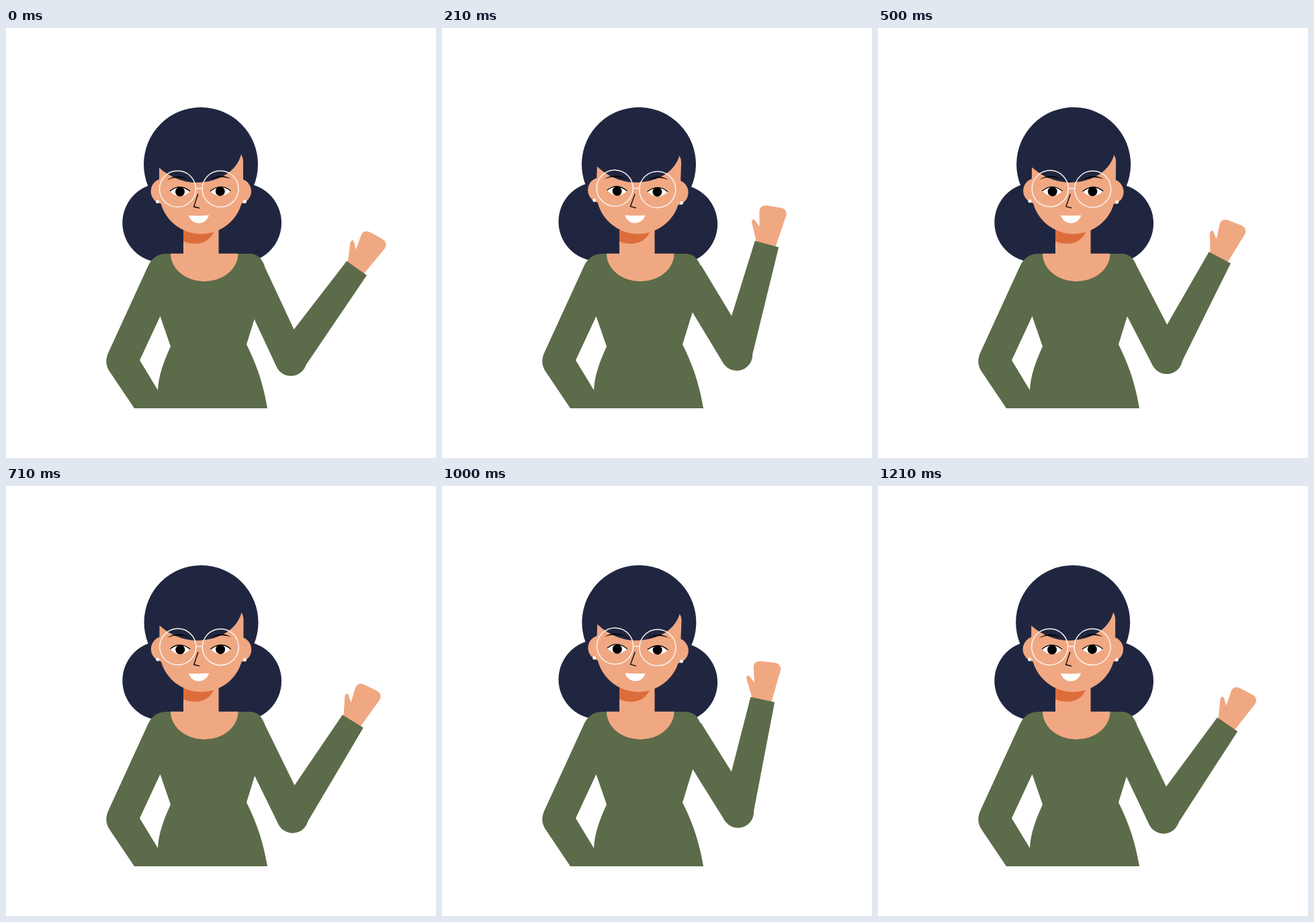
Recreate the animation shown at these times as an HTML page. Size 640 by 640 pixels, loop 1280 ms.

```html
<!DOCTYPE html>
<html lang="en">
<head>
<meta charset="utf-8">
<title>Waving woman</title>
<style>
  html, body { margin: 0; width: 100%; height: 100%; overflow: hidden; background: #fff; }
  svg { display: block; width: 100%; height: 100%; }
  .hair { fill: #212640; }
  .skin { fill: #f0a882; }
  .top { fill: #5c6b49; }
  .white { fill: #fff; }
  .line { fill: none; stroke: #000; stroke-width: 1.3; }
  .glass { fill: none; stroke: #fbf3ee; stroke-width: 1.5; }
</style>
</head>
<body>
<svg viewBox="0 0 640 640">
  <g class="head hair">
    <circle cx="232.3" cy="290" r="59"/>
    <circle cx="351" cy="290" r="59"/>
    <circle cx="290" cy="203" r="85"/>
  </g>

  <path class="skin" d="M264 280H316.500V340H264Z"/>
  <path fill="#dc6d3a" d="M264 290V317.500Q272 321 281 321C295 321 305 314 309.500 303V290Z"/>

  <path class="top" fill-rule="evenodd" d="M237 336H362C374 336 380 342 385 354V385L370 432L358 471C371 497 382 525 389 566H191L154 511Q146 499 151.500 485L212 353Q220 337 237 336Z
    M229.500 429L199 494.500L226 539C227 518 234 498 245 474Z"/>
  <path class="skin" d="M245 335.700H345.500A50.250 41.500 0 0 1 245 335.700Z"/>

  <g class="head">
    <circle class="skin" cx="234.500" cy="243" r="19"/>
    <circle class="skin" cx="346" cy="243" r="19"/>
    <path class="skin" d="M228 208C245 223 265 230 283 230C310 230 342 218 350 188Q353 193 353 198V244A62.500 62.500 0 0 1 228 244Z"/>
    <circle class="white" cx="225.500" cy="258.500" r="2.500"/>
    <circle class="white" cx="355.300" cy="258.500" r="2.500"/>

    <path d="M239 226.500Q256 215.500 272 225.500Q256 219 239 226.500Z"/>
    <path d="M304 225.500Q320 215.500 335 224.500Q320 219 304 225.500Z"/>

    <path class="white" d="M244 243Q258 230.500 274 243Q259 258 244 243Z"/>
    <path class="white" d="M304 243Q320 230 334.500 242.500Q319 257 304 243Z"/>
    <path class="line" stroke-width="1" d="M244 243Q258 230.500 274 243M304 243Q320 230 334.500 242.500"/>
    <circle cx="259" cy="243.800" r="7"/>
    <circle cx="318.800" cy="243" r="7"/>

    <path class="line" d="M285.800 247L279.500 266L288 268"/>
    <path class="white" d="M272 279Q287 280 302 278.500C300 286 294 290.500 287 290.500C280 290.500 274 286 272 279Z"/>

    <circle class="glass" cx="255.500" cy="239.500" r="27"/>
    <circle class="glass" cx="319" cy="239.500" r="27"/>
    <path class="glass" d="M282.500 238.700H292"/>
  </g>

  <!-- arm pieces hang from the shoulder and the elbow -->
  <g id="upper" class="top">
    <rect x="-23.500" y="14" width="47" height="142"/>
    <circle cy="156" r="23.500"/>
  </g>
  <g id="fore">
    <path class="skin" d="M-14.500 -165L-30.200 -194Q-31 -199 -27.800 -198.700Q-25.500 -198 -24 -196L-17.300 -190.500L-23 -211Q-26 -221.500 -15 -223.500L6 -225.800Q15.500 -226.500 16.800 -217L13.400 -165Z"/>
    <path class="top" d="M22.500 -4L18.300 -168.400H-18.300L-24.400 0Z"/>
  </g>
</svg>
<script>
  const LOOP = 1280, FPS = 14, FRAMES = 18, WAVE = 9;
  const SHOULDER = { x: 358, y: 353 }, ARM = 156;
  const heads = document.querySelectorAll('.head');
  const upper = document.getElementById('upper');
  const fore = document.getElementById('fore');

  const starts = Array.from({ length: FRAMES }, (_, i) => Math.round(i * 100 / FPS) * 10);

  // Blend of two smooth steps
  function ease(x) {
    const soft = x * x * (3 - 2 * x);
    const firm = x * x * x * (10 + x * (6 * x - 15));
    return 0.35 * soft + 0.65 * firm;
  }

  function swing(step) {
    const u = (step % WAVE + 0.22) / WAVE;
    return 1.06 * ease(u < 0.5 ? 2 * u : 2 - 2 * u);
  }

  function pose(k) {
    const a = 25 + 6.9 * k, rad = a * Math.PI / 180;
    const ex = SHOULDER.x + ARM * Math.sin(rad);
    const ey = SHOULDER.y + ARM * Math.cos(rad);
    for (const h of heads) h.setAttribute('transform', `rotate(${2.1 * k} 291 293)`);
    upper.setAttribute('transform', `translate(${SHOULDER.x} ${SHOULDER.y}) rotate(${-a})`);
    fore.setAttribute('transform',
      `translate(${ex} ${ey}) rotate(${35.7 - 23.1 * k}) translate(0 ${-3 * k})`);
  }

  function draw() {
    const t = performance.now() % LOOP;
    pose(swing(starts.findLastIndex(s => s <= t)));
    requestAnimationFrame(draw);
  }
  draw();
</script>
</body>
</html>
```
